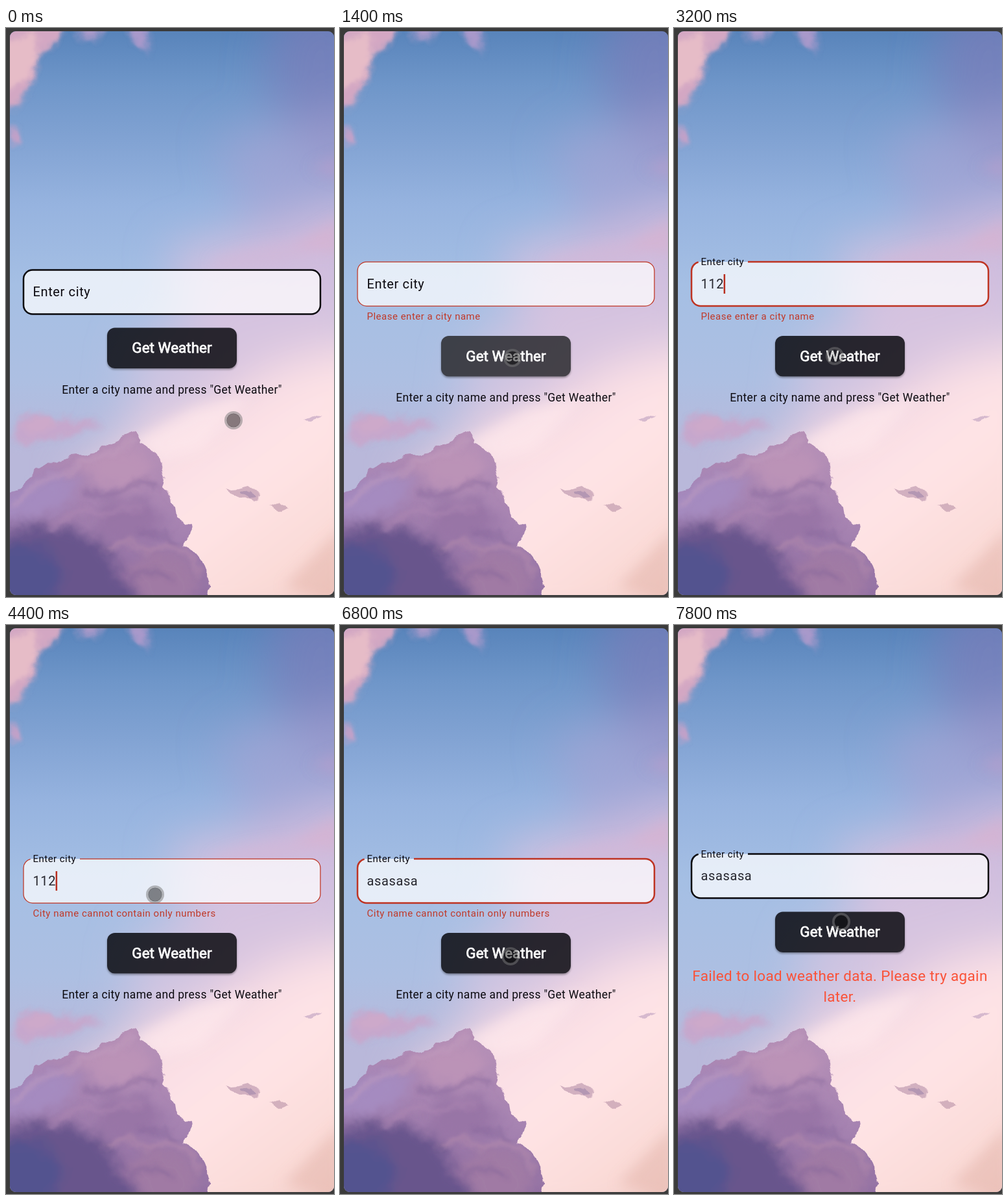
These frames come from a looping animation (506 by 876 pixels, 8000 ms). An HTML page:

```html
<!DOCTYPE html>
<html lang="en">
<head>
<meta charset="utf-8">
<title>Weather form</title>
<style>
  html, body { margin: 0; width: 100%; height: 100%; overflow: hidden; background: #3b3b3b; }
  svg { position: absolute; left: 0; top: 0; width: 100%; height: 100%; }
  #sky { will-change: transform; }
  text { font-family: Roboto, sans-serif; white-space: pre; }
  .body { font-size: 20px; letter-spacing: .625px; }
  .small { font-size: 15px; letter-spacing: .5px; fill: #c03a2a; }
  .prompt { font-size: 17.5px; letter-spacing: .3125px; fill: #0c0a10; }
  .fail { font-size: 22.5px; letter-spacing: .3125px; fill: #fa5238; }
  .button { font-size: 22.5px; fill: #fff; stroke: #fff; stroke-width: .8px; }
  .mid { text-anchor: middle; }
</style>
</head>
<body>
<svg id="sky" viewBox="0 0 506 876" preserveAspectRatio="none">
  <defs>
    <linearGradient id="air" x2="0" y2="1">
      <stop offset="0" stop-color="#5783ba"/>
      <stop offset=".1" stop-color="#6f96c9"/>
      <stop offset=".2" stop-color="#82a3d3"/>
      <stop offset=".31" stop-color="#96b3df"/>
      <stop offset=".45" stop-color="#a5bfe4"/>
      <stop offset=".62" stop-color="#adbfe2"/>
      <stop offset=".75" stop-color="#b9b8da"/>
    </linearGradient>
    <linearGradient id="dusk" x1=".3" x2="1" y1=".1" y2="1">
      <stop offset="0" stop-color="#f3d8e4"/>
      <stop offset=".4" stop-color="#ffe4e6"/>
      <stop offset=".7" stop-color="#fadad6"/>
      <stop offset="1" stop-color="#e9bbb0"/>
    </linearGradient>
    <linearGradient id="puff" x1=".6" y1="0" x2=".3" y2="1">
      <stop offset="0" stop-color="#b993b8"/>
      <stop offset=".45" stop-color="#a683b1"/>
      <stop offset="1" stop-color="#805f96"/>
    </linearGradient>
    <filter id="b4" x="-50%" y="-50%" width="200%" height="200%"><feGaussianBlur stdDeviation="4"/></filter>
    <filter id="b10" x="-50%" y="-50%" width="200%" height="200%"><feGaussianBlur stdDeviation="10"/></filter>
    <filter id="b34" x="-60%" y="-60%" width="220%" height="220%"><feGaussianBlur stdDeviation="34"/></filter>
    <filter id="fluff" x="-10%" y="-10%" width="120%" height="120%">
      <feTurbulence type="fractalNoise" baseFrequency=".035" numOctaves="3" seed="4" result="n"/>
      <feDisplacementMap in="SourceGraphic" in2="n" scale="20" xChannelSelector="R" yChannelSelector="G"/>
      <feGaussianBlur stdDeviation=".7"/>
    </filter>
    <clipPath id="card"><rect x="6" y="5" width="500" height="868" rx="9"/></clipPath>
    <clipPath id="cloud"><path id="cloudShape" d="M-10 725L22 703 45 682 75 665 105 659 132 654 160 640 185 628 203 621 211 631 207 640 222 646 236 662 246 690 242 705 257 720 262 750 273 758 287 763 288 773 276 785 271 797 289 806 301 820 309 840 314 858 310 890H-10Z"/></clipPath>
  </defs>
  <g clip-path="url(#card)">
    <rect width="506" height="876" fill="url(#air)"/>
    <g filter="url(#b34)">
      <path d="M420-40H560V240L470 200 400 90Z" fill="#7d7bb8" opacity=".65"/>
      <path d="M330 170L560 120V420L400 400Z" fill="#a9a2d2" opacity=".6"/>
      <path d="M250 340L400 310 560 260V600L330 640Z" fill="#d8c0de" opacity=".85"/>
      <path d="M200 480L330 420 560 400V640L180 650Z" fill="#d8c6e1" opacity=".75"/>
      <path d="M110 690L230 610 320 575 420 515 580 480V940H110Z" fill="url(#dusk)"/>
    </g>
    <g filter="url(#b10)">
      <ellipse cx="400" cy="350" rx="85" ry="16" fill="#d3b6d8" opacity=".55" transform="rotate(-9 400 350)"/>
      <path d="M440 335L515 290V350Z" fill="#d9b1cf" opacity=".6"/>
      <path d="M470 215L515 195V235Z" fill="#b79fcd" opacity=".6"/>
      <path d="M190 640L290 585 380 565 300 650 240 665Z" fill="#ffe9ec" opacity=".7"/>
      <path d="M430 860L515 770V890Z" fill="#e3b3aa" opacity=".5"/>
    </g>
    <g filter="url(#fluff)">
      <g filter="url(#b4)">
        <path d="M-10-10H98L78 22 52 42 43 72 32 100 12 128-10 120Z" fill="#d3a7c3"/>
        <path d="M-10 25L42 8 50 40 30 80-10 100Z" fill="#e6bcc7"/>
        <path d="M110-8H150L138 22 118 20Z" fill="#a99ac9"/>
        <path d="M185-8H218L222 40 196 22Z" fill="#a899ca"/>
        <path d="M4 152H20V180H4Z" fill="#c3a1c8"/>
      </g>
      <g filter="url(#b4)" opacity=".9">
        <path d="M10 630L20 600 52 590 72 602 150 606 115 622 60 638 22 641Z" fill="#c8a6cb"/>
        <path d="M20 612L52 598 80 612 40 626Z" fill="#d0a8c8"/>
      </g>
      <path d="M337 710L360 708 375 704 392 716 380 731 364 726 354 717Z" fill="#d2b0c0"/>
      <path d="M362 714L378 712 384 721 372 727Z" fill="#b497b3"/>
      <path d="M402 736L420 729 438 739 424 744Z" fill="#d3b0bd"/>
      <path d="M458 604L474 596 488 598 470 605Z" fill="#d6b9ce"/>
    </g>
    <g filter="url(#fluff)">
      <g clip-path="url(#cloud)">
        <rect x="-10" y="600" width="340" height="300" fill="url(#puff)"/>
        <g filter="url(#b10)">
          <path d="M-20 720L50 690 110 690 90 740-20 770Z" fill="#a58bc0"/>
          <path d="M110 668L190 640 225 670 215 705 150 710Z" fill="#bb93b7"/>
          <path d="M150 730L215 725 245 760 200 795 140 780Z" fill="#9874a6"/>
          <path d="M-20 790L40 762 95 772 150 790 175 840 215 895H-20Z" fill="#68548c"/>
          <path d="M-20 800L50 790 85 835 70 900H-20Z" fill="#53528f"/>
          <path d="M185 830L225 805 275 815 300 850 290 900H215Z" fill="#a07aa4"/>
        </g>
        <g filter="url(#b4)" fill="none" stroke-width="7" opacity=".6">
          <path d="M12 735L50 700 85 690 120 668 165 655 200 632" stroke="#c49fc0"/>
          <path d="M70 770L115 742 150 755 185 735 215 742" stroke="#b28bb5"/>
          <path d="M150 800L190 790 215 808 250 795 285 815 300 845" stroke="#bb91ae"/>
          <path d="M120 715L165 720 195 700 235 705M205 775L245 780 265 797M190 850L225 835 255 850" stroke="#82649a"/>
        </g>
      </g>
    </g>
  </g>
</svg>

<svg viewBox="0 0 506 876" preserveAspectRatio="none">
  <defs>
    <filter id="shade" x="-10%" y="-20%" width="120%" height="150%"><feGaussianBlur stdDeviation="1.5"/></filter>
    <mask id="outside">
      <rect x="140" y="-20" width="232" height="110" fill="#fff"/>
      <rect x="156" width="200" height="62.5" rx="12" fill="#000"/>
    </mask>
  </defs>
  <g id="field">
    <rect x="27" width="458" height="68" rx="14" fill="#fff" fill-opacity=".72"/>
    <path id="border" fill="none"/>
    <rect id="selection" x="41.5" y="22" width="35.5" height="23.5" fill="#aaa8d6"/>
    <text id="label"></text>
    <text id="value" class="body" x="41.5" y="40.5" fill="#26262e"></text>
    <rect id="caret" y="19" width="2.5" height="30" fill="#b92f20"/>
    <text id="error" class="small" x="41.5" y="89"></text>
  </g>
  <g id="action">
    <g mask="url(#outside)"><rect x="156" y="2" width="200" height="62.5" rx="12" opacity=".35" filter="url(#shade)"/></g>
    <rect x="156" width="200" height="62.5" rx="12" fill="#05060a" fill-opacity=".83"/>
    <rect id="press" x="156" width="200" height="62.5" rx="12" fill="#fff"/>
    <text class="button mid" x="256" y="38.5">Get Weather</text>
    <text id="prompt" class="prompt mid" x="256" y="101">Enter a city name and press "Get Weather"</text>
    <g id="fail">
      <text class="fail mid" x="256" y="106">Failed to load weather data. Please try again</text>
      <text class="fail mid" x="256" y="138.5">later.</text>
    </g>
  </g>
  <g id="pointer">
    <circle r="12" fill="none" stroke="#777" stroke-width="4" stroke-opacity=".5"/>
    <circle id="dot" r="10.5"/>
  </g>
</svg>

<script>
const LOOP = 8000, STEP = 200;
const $ = id => document.getElementById(id);
const set = (id, attrs) => { for (const k in attrs) $(id).setAttribute(k, attrs[k]); };
const show = (id, on) => set(id, { visibility: on ? 'visible' : 'hidden' });
const write = (id, s) => { if ($(id).textContent !== s) $(id).textContent = s; };
const mix = (a, b, p) => a + (b - a) * p;
const within = (t, a, b) => t >= a && t < b;

// Pointer stops: time, x, y
const PATH = [
  [0, 351, 604], [1000, 266, 508], [1400, 266, 508], [2200, 150, 395], [2700, 150, 395],
  [3200, 248, 505], [3800, 248, 505], [4400, 230, 415], [4600, 27, 396], [4800, 43, 380],
  [5400, 254, 493], [6400, 254, 493], [6800, 263, 510], [7200, 263, 510], [7800, 258, 457]
];

function pointerAt(t) {
  const i = PATH.findIndex(k => k[0] > t);
  if (i < 0) return PATH[PATH.length - 1].slice(1);
  const [t0, x0, y0] = PATH[i - 1], [t1, x1, y1] = PATH[i];
  let p = (t - t0) / (t1 - t0);
  p = p * p * (3 - 2 * p);
  return [mix(x0, x1, p), mix(y0, y1, p)];
}

function typed(t) {
  if (t < 5600) return '112'.slice(0, Math.max(0, (t - 2400) / STEP));
  return 'asasasa'.slice(0, 1 + (t - 5600) / STEP * 2);
}

// Outline that leaves room for the floating label
function drawBorder(gap, color, width) {
  const start = gap ? 114 : 41;
  set('border', {
    d: `M${start} 0H471a14 14 0 0 1 14 14V54a14 14 0 0 1-14 14H41a14 14 0 0 1-14-14V14a14 14 0 0 1 14-14`,
    stroke: color, 'stroke-width': width
  });
  const len = $('border').getTotalLength();
  set('border', { 'stroke-dasharray': gap ? `${len - 4} 200` : 'none' });
}

function render(time) {
  const t = Math.floor(time % LOOP / STEP) * STEP;
  const invalid = within(t, 1400, 7200), failed = t >= 7400;
  const focused = within(t, 2400, 3800) || within(t, 4600, 7200);
  const float = t < 2400 ? 0 : t < 2600 ? .88 : 1;
  const y = failed ? 352.5 : invalid ? 360 : 372.5;

  set('field', { transform: `translate(0 ${y})` });
  set('action', { transform: `translate(0 ${y + (invalid ? 114 : 89)})` });
  drawBorder(float > 0, invalid ? '#be3322' : '#08070b', invalid && !focused ? 1.25 : 2.5);

  write('label', 'Enter city');
  set('label', {
    x: 41.5, y: mix(40.5, 5, float), fill: '#0c0a10',
    style: `font-size:${mix(20, 15, float)}px;letter-spacing:${mix(.625, .47, float)}px`
  });

  const selected = within(t, 4800, 5600), value = typed(t);
  write('value', value);
  show('selection', selected);
  show('caret', within(t, 2400, 6600) && !selected);
  set('caret', { x: 41 + (t < 5600 ? value.length * 11.86 : value.length * 11.27) });

  write('error', !invalid ? '' : t < 3800 ? 'Please enter a city name' : 'City name cannot contain only numbers');
  show('prompt', !failed);
  show('fail', failed);

  const press = within(t, 1400, 1600) || t === 3600 || t === 7000 ? .12 : t === 1600 || t === 3800 ? .05 : 0;
  set('press', { 'fill-opacity': press });

  const [px, py] = pointerAt(t);
  set('pointer', { transform: `translate(${px} ${py})` });
  set('dot', { 'fill-opacity': t === 3200 ? .14 : .46 });
}

const begin = performance.now();
function tick() {
  render(performance.now() - begin);
  requestAnimationFrame(tick);
}
tick();
</script>
</body>
</html>
```
